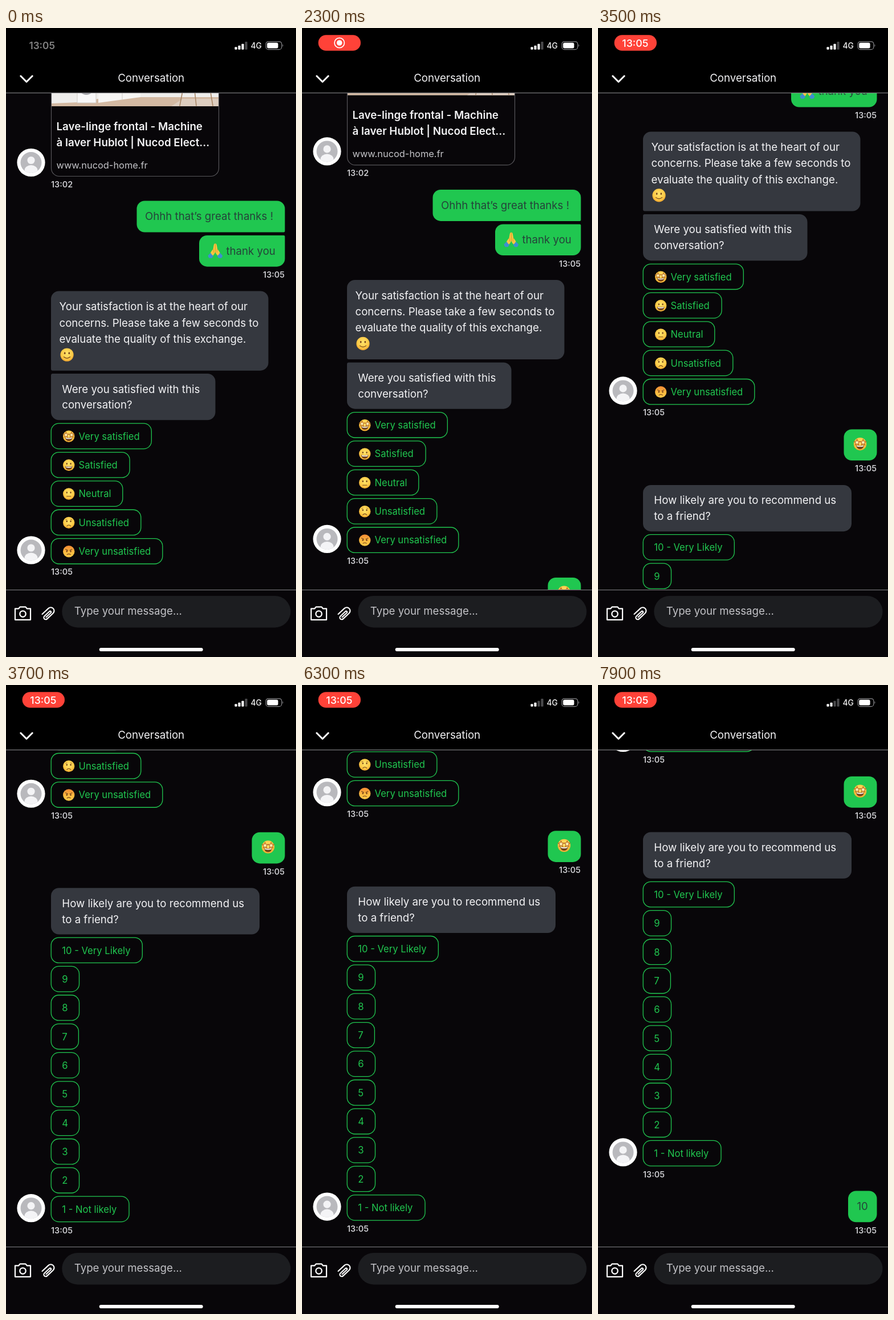
Animation, 509 px wide and 1101 px high, one loop 8000 ms. Source, as an HTML page:

```html
<!DOCTYPE html>
<html lang="en">
<head>
<meta charset="utf-8">
<title>Conversation</title>
<style>
  html, body { margin: 0; width: 100%; height: 100%; overflow: hidden; background: #080609; }
  svg { display: block; font-family: Inter, "Noto Sans", sans-serif; }
  text { white-space: pre; }
</style>
</head>
<body>
<svg id="stage" width="509" height="1101" viewBox="0 0 509 1101">
  <defs>
    <radialGradient id="skin" cx=".5" cy=".4" r=".62">
      <stop offset="0" stop-color="#ffe36c"/>
      <stop offset=".65" stop-color="#fdcb48"/>
      <stop offset="1" stop-color="#f0a32c"/>
    </radialGradient>
    <linearGradient id="rage" x2="0" y2="1">
      <stop offset="0" stop-color="#f28a34"/>
      <stop offset=".6" stop-color="#fbbd42"/>
      <stop offset="1" stop-color="#fbc648"/>
    </linearGradient>
    <clipPath id="disc"><circle r="18.5"/></clipPath>
  </defs>
  <g id="chat"></g>
  <g id="chrome"></g>
</svg>
<script>
const LOOP = 8000, STEP = 100;
const GREEN = '#20c750', GREY = '#35383f', INK = '#f3f3f5', DARK = '#25433a';
const chat = document.getElementById('chat');
const chrome = document.getElementById('chrome');

function add(parent, tag, attrs = {}, content) {
  const el = document.createElementNS('http://www.w3.org/2000/svg', tag);
  for (const key in attrs) el.setAttribute(key, attrs[key]);
  if (content !== undefined) el.textContent = content;
  parent.append(el);
  return el;
}
const group = (parent, x = 0, y = 0, scale = 1) =>
  add(parent, 'g', { transform: `translate(${x} ${y}) scale(${scale})` });
const rect = (p, x, y, width, height, fill, rx = 0) => add(p, 'rect', { x, y, width, height, fill, rx });
const circle = (p, cx, cy, r, fill, more) => add(p, 'circle', { cx, cy, r, fill, ...more });
const path = (p, d, fill, more) => add(p, 'path', { d, fill, ...more });
const line = (p, d, stroke, width) => path(p, d, 'none',
  { stroke, 'stroke-width': width, 'stroke-linecap': 'round', 'stroke-linejoin': 'round' });
const label = (p, x, y, text, size, fill, weight = 400, anchor = 'start') => add(p, 'text',
  { x, y, fill, 'font-size': size, 'font-weight': weight, 'text-anchor': anchor }, text);

// Box whose corners are listed clockwise from the top left
function bubble(p, x, y, right, bottom, fill, [a, b, c, d] = [14, 14, 14, 14]) {
  path(p, `M${x + a} ${y}H${right - b}a${b} ${b} 0 0 1 ${b} ${b}V${bottom - c}a${c} ${c} 0 0 1 ${-c} ${c}` +
    `H${x + d}a${d} ${d} 0 0 1 ${-d} ${-d}V${y + a}a${a} ${a} 0 0 1 ${a} ${-a}z`, fill);
}
const say = (p, x, y, text, fill = INK) => label(p, x, y, text, 18.65, fill);
const stampLeft = (p, y, text) => label(p, 79, y, text, 14.3, '#c9c9cd', 600);
const stampRight = (p, y) => label(p, 489, y, '13:05', 14.3, '#c9c9cd', 600, 'end');

function avatar(p, y) {
  const g = group(p, 44, y);
  circle(g, 0, 0, 24.6, '#fff');
  circle(g, 0, 0, 18.5, '#b9b9bd');
  const body = add(g, 'g', { 'clip-path': 'url(#disc)' });
  circle(body, 0, -4, 6.6, '#f4f4f6');
  add(body, 'ellipse', { cy: 14, rx: 11.5, ry: 9.5, fill: '#f4f4f6' });
}

// Faces are drawn on a radius of 10
function star(p, cx) {
  const pts = Array.from({ length: 10 }, (_, i) => {
    const r = i % 2 ? 2.2 : 4.7, a = i * Math.PI / 5 - Math.PI / 2;
    return `${cx + r * Math.cos(a)},${-2.4 + r * Math.sin(a)}`;
  });
  add(p, 'polygon', { points: pts.join(' '), fill: '#fff0b4', stroke: '#b5651d', 'stroke-width': 1 });
}
function face(p, x, y, r, mood) {
  const g = group(p, x, y, r / 10), brown = '#74431a';
  circle(g, 0, 0, 10, mood === 'angry' ? 'url(#rage)' : 'url(#skin)');
  if (mood === 'stars' || mood === 'happy') {
    path(g, 'M-6.2 1.6Q0 3.2 6.2 1.6Q5.6 8 0 8T-6.2 1.6z', brown);
    path(g, 'M-5.4 2.2Q0 3.6 5.4 2.2L4.9 3.8Q0 5-4.9 3.8z', '#fff');
  }
  if (mood === 'stars') {
    star(g, -4.8);
    star(g, 4.8);
    return;
  }
  for (const s of [-1, 1]) {
    add(g, 'ellipse', { cx: 3.3 * s, cy: mood === 'angry' ? -.2 : -2.4, rx: 1.15, ry: 1.6, fill: brown });
    if (mood === 'angry') line(g, `M${1.6 * s}-1.9L${5.6 * s}-3.6`, brown, 1);
    if (mood === 'sad') line(g, `M${3 * s}-5.8L${5.6 * s}-4.9`, brown, .6);
  }
  const mouth = { smile: 'M-4.8 3.2Q0 7.2 4.8 3.2', flat: 'M-3.6 4.2H3.6', sad: 'M-3.4 5.8Q0 2.4 3.4 5.8', angry: 'M-3 5.4Q0 3.2 3 5.4' };
  if (mouth[mood]) line(g, mouth[mood], brown, 1.05);
}
function hands(p, x, y) {
  const g = group(p, x, y);
  for (const s of [-1, 1]) {
    const h = add(g, 'g', { transform: `scale(${s} 1)` });
    path(h, 'M0-12.6Q2-13.2 2.6-10L3.8-3Q7.2 1 8.8 4.4L4.2 8.8Q1.2 5.4 0 2z', '#fbc640');
    line(h, 'M3.6-3Q2.4 .4 2.8 3', '#cf8d2b', .8);
    path(h, 'M8 3.4L12.8 8.2Q12.6 11.6 10.4 12.8H5.8L3.2 8.8Q6.8 7 8 3.4z', '#3f8fd0');
  }
  line(g, 'M0-12V2', '#cf8d2b', .8);
}

function option(p, y, right, text, mood) {
  add(p, 'rect', { x: 79.2, y: y + .2, width: right - 79.4, height: 44.4, rx: 13.5,
    fill: 'none', stroke: GREEN, 'stroke-width': 1.3 });
  if (mood) face(p, 110.2, y + 22.8, 10.2, mood);
  label(p, mood ? 127.6 : 98.3, y + 28.7, text, 16.6, GREEN);
}

function productCard(p) {
  rect(p, 80, 90, 293, 47, '#efeeec');
  path(p, 'M80 132L128 130L162 124L236 121H373V137H80z', '#d3b9a2');
  path(p, 'M290 137L310 124H373V137z', '#ddcdbf');
  path(p, 'M162 90H236V121L162 131z', '#f7f6f4');
  rect(p, 125, 90, 33, 41, '#f8f8f8');
  path(p, 'M131 113Q141 121 151 113z', '#a3a4a8');
  line(p, 'M125 100V131H158V100M204 100V125', '#cfccc8', 1);
  line(p, 'M312 100L305 136M330 100L334 136M357 100L363 136', '#a88767', 1.6);
  path(p, 'M79.5 90V245.5a14 14 0 0 0 14 14H359.5a14 14 0 0 0 14-14V90', 'none',
    { stroke: '#57565a', 'stroke-width': 1.2 });
  label(p, 88.5, 179, 'Lave-linge frontal - Machine', 18.8, INK, 600);
  label(p, 88.5, 206.5, 'à laver Hublot | Nucod Elect...', 18.8, INK, 600);
  label(p, 88.5, 246, 'www.nucod-home.fr', 16.4, '#c4c4c8');
}

function buildChat() {
  productCard(chat);
  avatar(chat, 235.5);
  stampLeft(chat, 279, '13:02');

  bubble(chat, 229.5, 302.5, 489.5, 357.5, GREEN, [14, 14, 2, 14]);
  say(chat, 244, 336.3, 'Ohhh that’s great thanks !', DARK);
  bubble(chat, 339, 363, 489.5, 417.7, GREEN, [14, 2, 14, 14]);
  hands(chat, 367.3, 390);
  say(chat, 386.5, 396.6, 'thank you', DARK);
  stampRight(chat, 437.2);

  bubble(chat, 79, 460.5, 460.5, 599.7, GREY, [14, 14, 14, 3]);
  ['Your satisfaction is at the heart of our',
   'concerns. Please take a few seconds to',
   'evaluate the quality of this exchange.']
    .forEach((row, i) => say(chat, 93.5, 494.3 + i * 28.2, row));
  face(chat, 107, 572, 11.6, 'smile');
  bubble(chat, 79, 605, 367.5, 686.3, GREY, [3, 14, 14, 14]);
  say(chat, 98.3, 638.6, 'Were you satisfied with this');
  say(chat, 98.3, 666.3, 'conversation?');

  [[255.5, 'Very satisfied', 'stars'], [217.3, 'Satisfied', 'happy'], [205, 'Neutral', 'flat'],
   [237, 'Unsatisfied', 'sad'], [275, 'Very unsatisfied', 'angry']]
    .forEach(([right, text, mood], i) => option(chat, 692 + i * 50.35, right, text, mood));
  avatar(chat, 914);
  stampLeft(chat, 957.4, '13:05');

  const rating = add(chat, 'g');
  bubble(rating, 431.5, 981.5, 489.5, 1036.2, GREEN);
  face(rating, 460, 1007.3, 11.2, 'stars');
  stampRight(rating, 1055.4);

  bubble(chat, 79, 1079, 445, 1160.3, GREY);
  say(chat, 98.3, 1112.6, 'How likely are you to recommend us');
  say(chat, 98.3, 1140.3, 'to a friend?');
  for (let n = 10; n > 0; n--) {
    const text = n === 10 ? '10 - Very Likely' : n === 1 ? '1 - Not likely' : String(n);
    const right = n === 10 ? 239.5 : n === 1 ? 216.2 : n === 7 ? 127.6 : 128.7;
    option(chat, 1165.6 + (10 - n) * 50.35, right, text);
  }
  avatar(chat, 1639.4);
  stampLeft(chat, 1683.5, '13:05');

  const score = add(chat, 'g');
  bubble(score, 439, 1707, 489.5, 1761.8, GREEN);
  say(score, 464.2, 1740.4, '10', DARK).setAttribute('text-anchor', 'middle');
  stampRight(score, 1781);
  return { rating, score };
}

function buildChrome() {
  rect(chrome, 0, 0, 509, 113.5, '#000');
  rect(chrome, 0, 113, 509, 1.2, '#7b7a7d');
  line(chrome, 'M25.8 84L36 94.2L46.2 84', '#fff', 3);
  label(chrome, 254.7, 93.6, 'Conversation', 18.7, INK, 400, 'middle');

  const bars = [4.5, 7, 10, 13.7].map((h, i) => rect(chrome, 401.4 + i * 6, 37.8 - h, 4.2, h, '#fff', 1));
  label(chrome, 429.5, 36, '4G', 13.8, '#f4f4f4', 500);
  add(chrome, 'rect', { x: 456.2, y: 23.8, width: 27.6, height: 13.8, rx: 4.2, fill: 'none', stroke: '#89898c', 'stroke-width': 1.2 });
  rect(chrome, 458.2, 25.8, 19.4, 9.8, '#fff', 2.5);
  path(chrome, 'M485.4 28.3Q487.6 30.6 485.4 33z', '#89898c');

  const clock = label(chrome, 63.2, 37.2, '13:05', 17.2, '#fff', 600, 'middle');
  const pill = add(chrome, 'g');
  const fill = rect(pill, 28.6, 12.3, 74.4, 27.4, '#ff4238', 13.7);
  const icon = group(pill, 65.7, 26);
  circle(icon, 0, 0, 8.7, 'none', { stroke: '#fff', 'stroke-width': 1.7 });
  circle(icon, 0, 0, 4.8, '#fff');
  const time = label(pill, 65.4, 32.5, '13:05', 17.8, '#fff', 500, 'middle');

  rect(chrome, 0, 983, 509, 118, '#080609');
  rect(chrome, 0, 983, 509, 1.2, '#727174');
  line(chrome, 'M16 1016.3H22.2L24.6 1013.4H34.4L36.8 1016.3H43V1035.8H16z', '#fff', 2.2);
  circle(chrome, 29.5, 1025.6, 5.2, 'none', { stroke: '#fff', 'stroke-width': 2.3 });
  const clip = line(chrome, 'M6 -3.6H-7a3.6 3.6 0 0 0 0 7.2H8.5a6.4 6.4 0 0 0 0-12.8H-7.5M6-3.6a1.7 1.7 0 0 1 0 3.6H-6', '#fff', 2.3);
  clip.setAttribute('transform', 'translate(74.5 1027.5) rotate(-43) scale(.93)');
  rect(chrome, 98.3, 994, 401.2, 55.4, '#1c1d20', 27.7);
  label(chrome, 119.8, 1027.3, 'Type your message...', 18.65, '#c3c3c7');
  rect(chrome, 163.7, 1085, 182, 6, '#fff', 3);
  return { bars, clock, pill, fill, icon, time };
}

const { rating, score } = buildChat();
const ui = buildChrome();

// Start time and distance of each scroll
const scrolls = [[2200, 96], [3378.6, 630.3], [6700, 95.2]];
const SCROLL_MS = 335;
const clamp = v => Math.min(1, Math.max(0, v));
const ease = v => .5 - .5 * Math.cos(Math.PI * clamp(v));
const show = (el, on) => el.setAttribute('visibility', on ? 'visible' : 'hidden');

function render(t) {
  const y = scrolls.reduce((sum, [at, dist]) => sum + dist * ease((t - at) / SCROLL_MS), 0);
  chat.setAttribute('transform', `translate(0 ${-y.toFixed(2)})`);
  show(rating, t >= scrolls[0][0]);
  show(score, t >= scrolls[2][0]);

  // Recording pill: fades in, then pulses every two seconds
  const dim = Math.max(0, -Math.cos(Math.PI * t / 1000));
  ui.clock.setAttribute('opacity', .5 * clamp(1 - t / 200));
  ui.pill.setAttribute('opacity', clamp(t / 300));
  ui.fill.setAttribute('fill', `rgb(${255 - 44 * dim},${66 - 8 * dim},${56 - 6 * dim})`);
  show(ui.icon, t < 2900);
  show(ui.time, t >= 2900);

  const strength = t < 5900 ? 3 : 2;
  ui.bars.forEach((bar, i) => bar.setAttribute('fill', i < strength ? '#fff' : '#4a4a4c'));
}

const start = performance.now();
function tick() {
  const t = performance.now() - start + 25;
  render(Math.floor(t / STEP) * STEP % LOOP);
  requestAnimationFrame(tick);
}
render(0);
requestAnimationFrame(tick);
</script>
</body>
</html>
```
